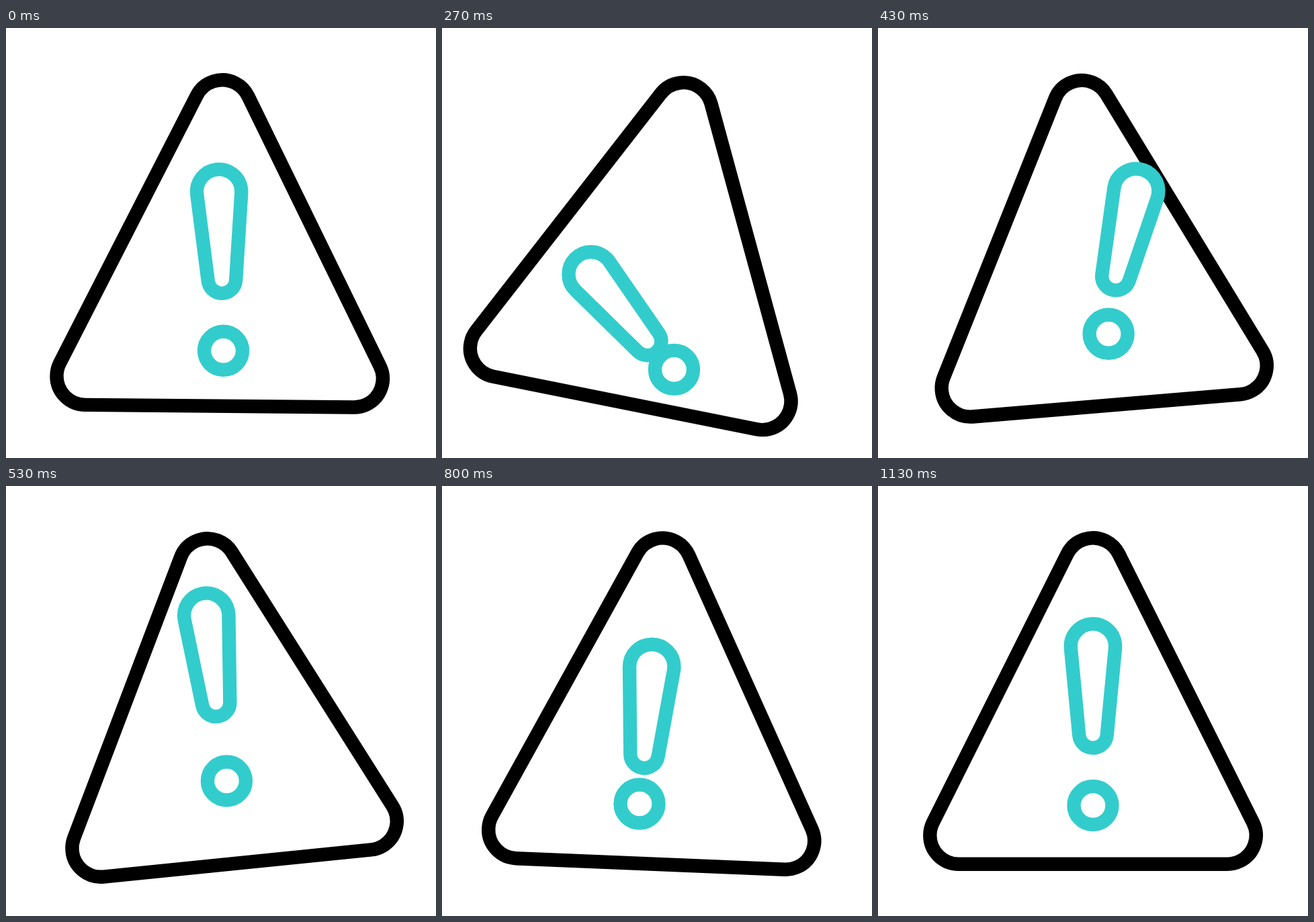
Animation, 640 px wide and 640 px high, one loop 1.67 s. Source, as an HTML page with a canvas:

```html
<!DOCTYPE html>
<html lang="en">
<head>
<meta charset="utf-8">
<title>Warning sign</title>
<style>
  html, body { margin: 0; width: 100%; height: 100%; overflow: hidden; background: #fff; }
  canvas { display: block; width: 100vw; height: 100vh; }
</style>
</head>
<body>
<canvas id="stage" width="640" height="640"></canvas>
<script>
const ctx = document.getElementById('stage').getContext('2d');
const LOOP = 1670;
const TEAL = '#33cccc';
const DOT = { x: 320, y: 475.5 };

// Eased change by an amount between two steps; a motion is a sum of these.
function swing(step, amount, from, to) {
  const u = Math.min(1, Math.max(0, (step - from) / (to - from)));
  return amount * u * u * (3 - 2 * u);
}

// Rocks to 12 degrees, back to -6, over to 3 and home.
function signAngle(k) {
  return swing(k, 12, -0.8, 5.5) - swing(k, 18, 7.2, 14.1)
    + swing(k, 9, 15.4, 21.5) - swing(k, 3, 21.5, 30);
}

function barAngle(k) {
  return -swing(k, 42, -0.8, 5.5) + swing(k, 63, 7.6, 11.4)
    - swing(k, 27.3, 11.4, 16) + swing(k, 11.2, 16, 24) - swing(k, 4.9, 24, 34);
}

function barShift(k) {
  return {
    x: swing(k, 55.5, -2, 9) - swing(k, 47.5, 8.5, 13.5)
      - swing(k, 36, 14, 24) + swing(k, 28, 24, 34),
    y: swing(k, 72.5, -1.5, 7.8) - swing(k, 119.7, 8.8, 16)
      + swing(k, 76.9, 16, 24) - swing(k, 29.7, 24, 34)
  };
}

function dotShift(k) {
  return {
    x: swing(k, 28, -3, 10.5) - swing(k, 54, 10.5, 24) + swing(k, 26, 24, 34),
    y: swing(k, 33.7, -2.5, 8) - swing(k, 70.2, 7.5, 15.5) + swing(k, 36.5, 16, 25.5)
  };
}

// Draws a white shape with a coloured outline, moved and turned about a pivot.
function place(pivot, shift, degrees, color, path) {
  ctx.save();
  ctx.translate(pivot.x + shift.x, pivot.y + shift.y);
  ctx.rotate(degrees * Math.PI / 180);
  ctx.translate(-pivot.x, -pivot.y);
  ctx.beginPath();
  path();
  ctx.fillStyle = '#fff';
  ctx.fill();
  ctx.strokeStyle = color;
  ctx.stroke();
  ctx.restore();
}

function signPath() {
  const r = 42.7, lean = Math.atan(0.5);
  ctx.arc(320, 120, r, Math.PI + lean, -lean);
  ctx.arc(520, 520, r, -lean, Math.PI / 2);
  ctx.arc(120, 520, r, Math.PI / 2, Math.PI + lean);
  ctx.closePath();
}

function barPath() {
  const top = { y: 238.4, r: 33.2 }, bottom = { y: 369, r: 20.8 };
  const lean = Math.asin((top.r - bottom.r) / (bottom.y - top.y));
  ctx.arc(320, top.y, top.r, Math.PI - lean, lean);
  ctx.arc(320, bottom.y, bottom.r, lean, Math.PI - lean);
  ctx.closePath();
}

function dotPath() {
  ctx.arc(DOT.x, DOT.y, 28.5, 0, Math.PI * 2);
}

function render(time) {
  // 30 steps per second, starting on whole hundredths.
  const ticks = Math.floor((time % LOOP) / 10) * 10;
  const step = Math.floor((ticks + 5) * 0.03);

  ctx.fillStyle = '#fff';
  ctx.fillRect(0, 0, 640, 640);
  ctx.lineWidth = 20.4;
  place({ x: 320, y: 320 }, { x: 0, y: 0 }, signAngle(step), '#000', signPath);
  place(DOT, barShift(step), barAngle(step), TEAL, barPath);
  place(DOT, dotShift(step), 0, TEAL, dotPath);
}

const start = performance.now();
function tick() {
  render(performance.now() - start);
  requestAnimationFrame(tick);
}
tick();
</script>
</body>
</html>
```
